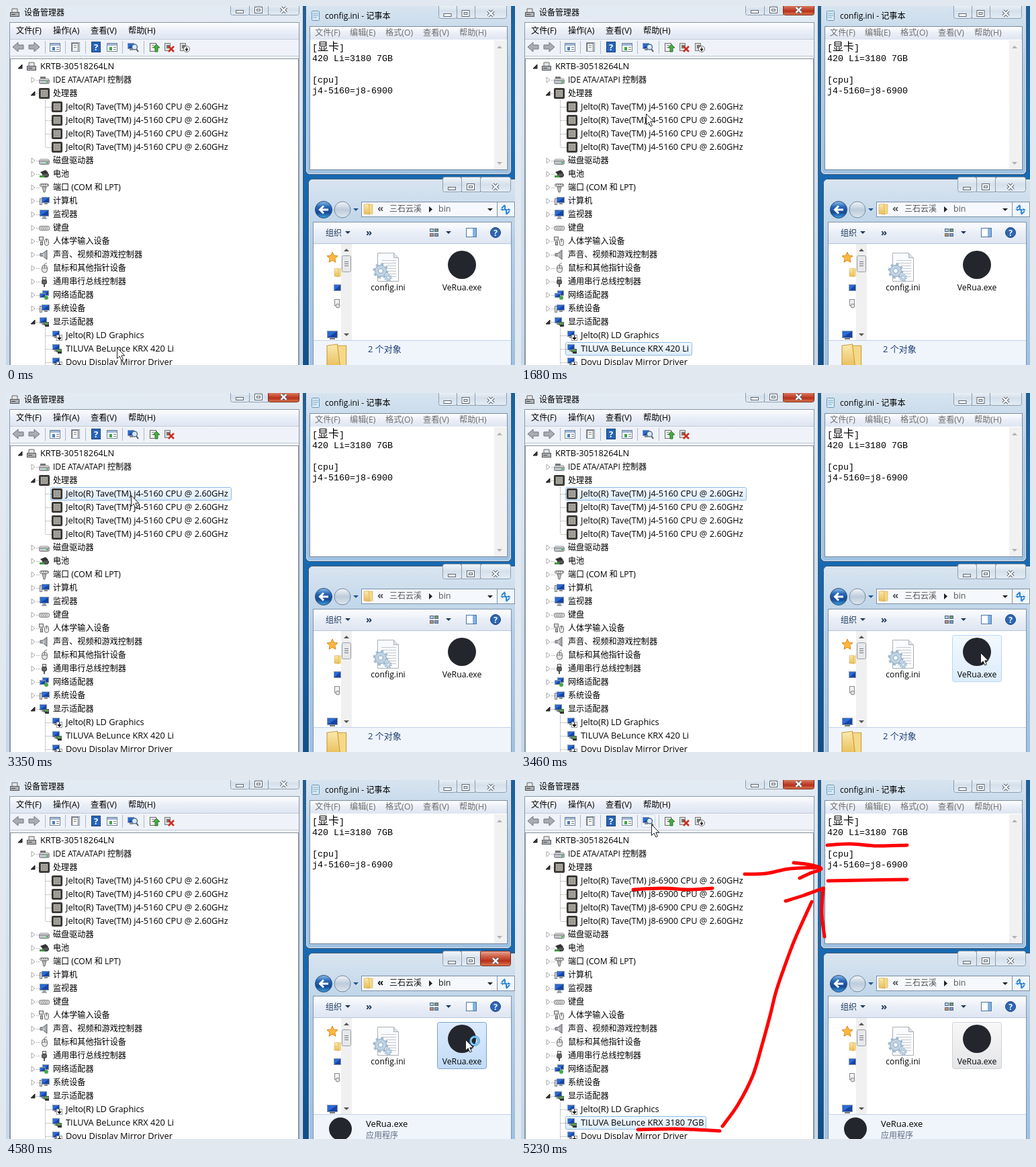
Animation, 758 px wide and 534 px high, one loop 7.31 s. Source, as an HTML page:

```html
<!DOCTYPE html>
<html lang="zh-CN">
<head>
<meta charset="utf-8">
<style>
html, body { margin: 0; width: 100%; height: 100%; overflow: hidden; background: #1766ab; }
svg { display: block; width: 758px; height: 534px; }
text { font-family: "Open Sans", "Noto Sans CJK SC", "Noto Sans CJK", sans-serif; white-space: pre; }
.mono { font-family: "Liberation Mono", "Noto Sans CJK SC", "Noto Sans CJK", monospace; }
</style>
</head>
<body>
<svg id="stage" viewBox="0 0 758 534"></svg>
<script>
const LOOP = 7310;

// ---- drawing helpers ----
const rect = (x, y, w, h, fill, stroke = 'none', r = 0) => {
  const o = stroke === 'none' ? 0 : 0.5;
  return `<rect x="${x + o}" y="${y + o}" width="${w - 2 * o}" height="${h - 2 * o}" rx="${r}" fill="${fill}" stroke="${stroke}"/>`;
};
const path = (d, fill, stroke = 'none', width = 1, extra = '') =>
  `<path d="${d}" fill="${fill}" stroke="${stroke}" stroke-width="${width}" ${extra}/>`;
const circle = (x, y, r, fill, stroke = 'none', width = 1, extra = '') =>
  `<circle cx="${x}" cy="${y}" r="${r}" fill="${fill}" stroke="${stroke}" stroke-width="${width}" ${extra}/>`;
const text = (x, y, s, size = 12, fill = '#000', extra = '') =>
  `<text x="${x}" y="${y}" font-size="${size}" fill="${fill}" ${extra}>${s}</text>`;
const at = (x, y, content, k = 1) => `<g transform="translate(${x} ${y}) scale(${k})">${content}</g>`;
const gradient = (id, ...stops) =>
  `<linearGradient id="${id}" x2="0" y2="1">${stops.map((c, i) =>
    `<stop offset="${i / (stops.length - 1)}" stop-color="${c}"/>`).join('')}</linearGradient>`;
const down = (x, y, fill = '#1e3a5c') => path(`M${x - 4} ${y - 2}h8l-4 4z`, fill);
const up = (x, y, fill) => path(`M${x - 4} ${y + 2}h8l-4-4z`, fill);

// Smooth red marker line through a few points
function marker(...pts) {
  let d = `M${pts[0]}`;
  for (let i = 0; i < pts.length - 1; i++) {
    const [a, b, c, e] = [pts[i - 1] || pts[i], pts[i], pts[i + 1], pts[i + 2] || pts[i + 1]];
    d += `C${b[0] + (c[0] - a[0]) / 6} ${b[1] + (c[1] - a[1]) / 6} ${c[0] - (e[0] - b[0]) / 6} ${c[1] - (e[1] - b[1]) / 6} ${c}`;
  }
  return path(d, 'none', '#f00', 5, 'stroke-linecap="round" stroke-linejoin="round"');
}

const defs = `<defs>
${gradient('desk', '#17619f', '#1b6fb8', '#1261a8', '#0e4f8d')}
${gradient('glass', '#e3ebf3', '#d3e0ed', '#c3d7ea')}
${gradient('clearGlass', '#d9e5f0', '#b4cee6', '#a6c6e4', '#9dc0e2')}
${gradient('bar', '#fdfeff', '#e9eef7', '#dfe6f2')}
${gradient('button', '#f2f6fa', '#d5e0eb', '#e3ecf5')}
${gradient('close', '#e9a999', '#d0644a', '#b8301a', '#dc7c52')}
${gradient('row', '#f3f9fe', '#dcecfb')}
${gradient('item', '#dcebfc', '#c1dbf8')}
${gradient('itemOff', '#f8f8f8', '#e4e5e8')}
${gradient('orb', '#8fc0ec', '#2566b8', '#164a94', '#3fa4e4')}
${gradient('orbOff', '#f3f6f9', '#bccbdb', '#dfe7ee')}
${gradient('folder', '#fbeab0', '#e8bd55')}
</defs>`;

// ---- 16 px icons ----
const screen = (x, y, w, h) => rect(x, y, w, h, '#2a6ad4', '#8c98a8') +
  path(`M${x + 1} ${y + h - 1}L${x + w - 1} ${y + 1}V${y + h - 1}z`, '#1644a5');
const card = screen(1, 1, 11, 9) + rect(4, 10, 5, 2, '#888');
const drive = path('M2 6h12l2 3H0z', '#e6e8ea', '#8c8e92') + rect(0, 8, 16, 6, '#c0c4c8', '#707478', 2) + rect(11, 10, 3, 2, '#3cb44a');
const pc = screen(4, 2, 12, 9) + rect(8, 11, 5, 2, '#888') + rect(1, 4, 4, 10, '#d5d8dc', '#787c82');
const icons = {
  drive,
  ide: drive + rect(2, 3, 8, 3, '#777'),
  root: path('M4 2h8v6H4z', '#e4e6e8', '#666') + rect(1, 7, 14, 7, '#aeb3b8', '#555') + rect(3, 10, 6, 1, '#444'),
  chip: rect(0, 0, 16, 16, '#45433f', '#292826', 1) + rect(3, 3, 10, 10, '#8d8b86', '#c8c5bb') + rect(5, 5, 6, 6, '#a09e98'),
  battery: path('M2 5l8-3 4 4-7 4z', '#333') + rect(5, 6, 10, 7, '#555', '#222', 3) + path('M1 10h7v3H1z', '#3f9a40'),
  port: rect(1, 2, 14, 5, '#e4e4e4', '#777', 2) + path('M3 4h2m1 0h2m1 0h2m1 0h2', 'none', '#444') + path('M5 7h6l-2 8H7z', '#bbb', '#777'),
  pc,
  monitor: screen(1, 1, 14, 10) + path('M6 11h4l2 4H4z', '#9aa2ac'),
  keyboard: rect(0, 5, 16, 7, '#ddd', '#777', 2) + path('M2 7.500h12M3 9.500h10', 'none', '#888', 1, 'stroke-dasharray="2 1"'),
  hid: rect(0, 1, 7, 6, '#ddd', '#666') + rect(2, 8, 4, 6, '#bbb', '#666') + rect(8, 4, 7, 11, '#e8e8e8', '#666', 3) + path('M11.500 4v5', 'none', '#666'),
  sound: path('M2 6h4l6-5v14l-6-5H2z', '#a9adb2', '#5c6065') + path('M7 6v5', 'none', '#eee'),
  mouse: path('M8 4C8 0 11 1 12 0', 'none', '#666') + rect(4, 3, 9, 12, '#e6e6e6', '#666', 4) + path('M8.500 3v5M4 8h9', 'none', '#777'),
  usb: rect(5, 1, 6, 5, '#e5e5e5', '#555') + rect(4, 5, 8, 7, '#666', '#333', 2) + rect(7, 12, 2, 4, '#555'),
  net: screen(5, 1, 10, 8) + screen(1, 5, 9, 7) + circle(11, 12, 3, '#48a848'),
  card: card + rect(7, 8, 8, 5, '#5a9a52', '#49644a') + rect(9, 12, 6, 3, '#333'),
  off: card + rect(7, 7, 9, 9, '#fff', '#999') + path('M11.500 8v4M9 11.500h5l-2.500 3z', '#111', '#111'),
  scan: screen(0, 2, 10, 9) + rect(3, 11, 5, 2, '#888') + path('M13 11l3 4', 'none', '#555', 2) + circle(10.5, 8, 4, '#dbeaf8', '#50708f', 1.5)
};

// ---- window chrome ----
const frame = (x, y, w, h, glass) => rect(x, y, w, h, `url(#${glass})`, '#43586e', 6) + rect(x + 1, y + 1, w - 2, h - 2, 'none', '#dce9f4', 5);

function buttons(x, y, w1, w2, w3, h, active) {
  const ink = '#5c6670', line = '#8f9eae', close = x + w1 + w2;
  const mid = y + h - 8;
  return rect(x, y - 4, w1 + 1, h + 4, 'url(#button)', line, 3) + rect(x + w1, y - 4, w2 + 1, h + 4, 'url(#button)', line) +
    rect(close, y - 4, w3, h + 4, active ? 'url(#close)' : 'url(#button)', active ? '#7c2a1c' : line, 3) +
    rect(x + w1 / 2 - 6, mid, 12, 5, '#fff', ink) +
    rect(x + w1 + w2 / 2 - 6, mid - 5, 12, 10, '#fff', ink) + rect(x + w1 + w2 / 2 - 3, mid - 2, 6, 4, '#dfe7ef', ink) +
    [[ink, 4.5], ['#fff', 2.4]].map(([c, w]) =>
      path(`M${close + w3 / 2 - 4} ${mid - 4}l8 8m0-8l-8 8`, 'none', c, w)).join('');
}

const menu = (labels, xs, y, fill) => labels.map((s, i) => text(xs[i], y, s, 12.2, fill)).join('');
const help = (x, y) => circle(x, y, 7.5, '#2e66b5', '#1c4380') + text(x, y + 4.5, '?', 12, '#fff', 'text-anchor="middle" font-weight="700"');

// ---- device manager ----
const groups = [
  ['磁盘驱动器', 'drive'], ['电池', 'battery'], ['端口 (COM 和 LPT)', 'port'], ['计算机', 'pc'], ['监视器', 'monitor'],
  ['键盘', 'keyboard'], ['人体学输入设备', 'hid'], ['声音、视频和游戏控制器', 'sound'], ['鼠标和其他指针设备', 'mouse'],
  ['通用串行总线控制器', 'usb'], ['网络适配器', 'net'], ['系统设备', 'pc']
];

function treeRow(level, y, label, icon, open) {
  const x = 32 + level * 19, ex = x - 11;
  const arrow = open === undefined ? '' : open
    ? path(`M${ex + 3} ${y - 3}v6h-6z`, '#333', '#222')
    : path(`M${ex - 2} ${y - 4}l5 4-5 4z`, '#fff', '#a5a5a5');
  const dots = level ? path(`M${x - (level > 1 ? 11 : 6)} ${y + .5}H${x - 1}`, 'none', '#999', 1, 'stroke-dasharray="1 1"') : '';
  return dots + arrow + at(x - 2, y - 8, icons[icon]) + text(x + 19, y + 4, label, level === 1 ? 12.1 : 12.8);
}

function toolbar(s) {
  const arrow = (x, dir) => path(`M${x - 8 * dir} 61l${8 * dir}-7v4h${8 * dir}v6h${-8 * dir}v4z`, '#a9adb3', '#70757c');
  const panel = (x, c) => rect(x - 8, 55, 16, 13, '#fff', '#71849c') + rect(x - 7, 56, 14, 3, '#9db6d3') + rect(x - 4, 61, 4, 5, c) + rect(x + 2, 61, 4, 1, '#777') + rect(x + 2, 64, 4, 1, '#777');
  const separators = [58, 88, 118, 173, 205].map(x => rect(x, 52, 1, 19, '#aeb9c8')).join('');
  const sheet = x => rect(x - 5, 55, 10, 13, '#f2f2f2', '#666') + rect(x - 2, 58, 4, 1, '#888') + rect(x - 2, 61, 4, 1, '#888');
  const plug = x => rect(x - 7, 55, 9, 12, '#ddd', '#777') + rect(x - 4, 58, 6, 5, '#777');
  return separators + arrow(18, 1) + arrow(42, -1) + panel(73, '#4b7fc0') + sheet(103) + rect(97, 54, 13, 14, 'none', '#8595a8') +
    rect(127, 53, 14, 16, '#2864b8', '#174380') + text(134, 66, '?', 13, '#fff', 'text-anchor="middle" font-weight="700"') +
    panel(158, '#3fa547') +
    (s.scan ? rect(179, 51, 21, 20, '#f4f8fd', '#c3d5e8', 2) : '') + at(181, 53, icons.scan) +
    sheet(219) + path('M222 68v-6h-3l5-5 5 5h-3v6z', '#4cab45', '#287229') +
    plug(243) + path('M242 60l8 8m0-8l-8 8', 'none', '#d22c20', 2.5) +
    (s.noDisable ? '' : plug(266) + circle(269, 64, 4.5, '#fff', '#666') + path('M269 61v3m-2 0h4l-2 3z', '#222', '#222'));
}

function deviceManager(s) {
  const cpu = `Jelto(R) Tave(TM) ${s.spoofed ? 'j8-6900' : 'j4-5160'} CPU @ 2.60GHz`;
  const gpu = `TILUVA BeLunce KRX ${s.spoofed ? '3180 7GB' : '420 Li'}`;
  const select = s.sel === 'cpu' ? rect(66, 140, 270, 20, 'url(#row)', '#8fbbe6', 2)
    : s.sel === 'gpu' ? rect(66, 500, s.spoofed ? 210 : 189, 20, 'url(#row)', '#8fbbe6', 2) : '';
  const line = (x, y1, y2) => path(`M${x}.5 ${y1}V${y2}`, 'none', '#999', 1, 'stroke-dasharray="1 1"');
  return frame(-2, -12, 445, 570, 'glass') +
    at(5, 2, icons.root) + text(27, 14, '设备管理器') + buttons(334, 0, 28, 28, 47, 14, s.active === 'devices') +
    rect(5, 24, 432, 520, '#f0f3f8', '#8797a9') + rect(6, 25, 430, 24, 'url(#bar)') +
    menu(['文件(F)', '操作(A)', '查看(V)', '帮助(H)'], [15, 70, 126, 182], 41, '#000') +
    rect(6, 49, 430, 1, '#c3ccd9') + rect(6, 50, 430, 24, '#eff3f9') + rect(6, 74, 430, 1, '#c3ccd9') + toolbar(s) +
    rect(6, 78, 430, 460, '#fff', '#8a929c') + select + line(58, 140, 210) + line(58, 480, 534) +
    treeRow(0, 90, 'KRTB-30518264LN', 'root', true) +
    treeRow(1, 110, 'IDE ATA/ATAPI 控制器', 'ide', false) +
    treeRow(1, 130, '处理器', 'chip', true) +
    [150, 170, 190, 210].map(y => treeRow(2, y, cpu, 'chip')).join('') +
    groups.map(([label, icon], i) => treeRow(1, 230 + 20 * i, label, icon, false)).join('') +
    treeRow(1, 470, '显示适配器', 'card', true) +
    treeRow(2, 490, 'Jelto(R) LD Graphics', 'off') + treeRow(2, 510, gpu, 'card') + treeRow(2, 530, 'Dovu Display Mirror Driver', 'off');
}

// ---- notepad ----
const notepad = () => frame(446, -4, 307, 255, 'clearGlass') +
  rect(455, 7, 12, 15, '#d7ecf8', '#6d93b0', 1) + path('M457 11h8m-8 3h8m-8 3h6', 'none', '#7aa6c4') +
  text(475, 19, 'config.ini - 记事本', 12.1) + buttons(644, 0, 27, 27, 48, 19, false) +
  rect(452, 30, 295, 214, '#fff', '#7d8b9a') + rect(453, 31, 293, 19, 'url(#bar)') +
  menu(['文件(F)', '编辑(E)', '格式(O)', '查看(V)', '帮助(H)'], [460, 512, 565, 621, 675], 44, '#6d6d6d') +
  rect(727, 51, 18, 192, '#f1f1f1') + up(735, 61, '#b0b0b0') + down(735, 234, '#b0b0b0') +
  ['[<tspan font-size="16">显卡</tspan>]', '420 Li=3180 7GB', '', '[cpu]', 'j4-5160=j8-6900']
    .map((s, i) => text(456, 66 + 16 * i, s, 13.33, '#000', 'class="mono"')).join('');

// ---- file explorer ----
const gear = (x, y, k) => at(x, y, circle(0, 0, 8.5, '#bfd3e4', '#8aa6bf') +
  circle(0, 0, 10, 'none', '#9fb8cd', 3, 'stroke-dasharray="3.900 3.950"') + circle(0, 0, 3.5, '#f4f8fb', '#8aa6bf'), k);
const folder = (x, y, k) => at(x, y, path('M4 1h9v14H4z', '#f5d988', '#c99a3c', .5) + path('M0 1l7-1 2 16-9-1z', 'url(#folder)', '#c99a3c', .5), k);

function explorer(s) {
  const active = s.active === 'explorer', ink = active ? '#111' : '#555';
  const itemFill = { on: ['url(#item)', '#7da2ce'], hover: ['url(#row)', '#b8d6fb'], off: ['url(#itemOff)', '#d2d2d2'] }[s.item];
  const details = s.picked
    ? circle(498, 519, 17, '#24262d') + text(536, 516, 'VeRua.exe', 13) + text(536, 533, '应用程序', 12, '#5a6b83')
    : folder(478, 503, 2.2) + text(539, 515, '2 个对象', 13, '#1e3f74');
  return frame(450, 257, 316, 290, 'clearGlass') + buttons(650, 258, 28, 28, 46, 19, active) +
    circle(501, 303, 12, 'url(#orbOff)', '#74889d') + circle(473, 303, 12.5, 'url(#orb)', '#2b4a70') +
    path('M480 303h-12m5-5.500l-5.500 5.500 5.500 5.500', 'none', '#fff', 3) + down(521, 303, '#1d5590') +
    rect(529, 291, 203, 23, '#f5f9fd', '#7c90a6') + rect(731, 291, 27, 23, '#f0f6fc', '#7c90a6') +
    folder(533, 294, 1) + text(553, 306, '«', 15, ink, 'font-weight="700"') + text(571, 306, '三石云溪', 12, ink) +
    path('M630 298l5 4.500-5 4.500z', '#222') + text(644, 306, 'bin', 12.5, ink) + down(721, 303, '#222') +
    path('M743 297v7m-5-3l5-5M745 309v-7m5 3l-5 5', 'none', '#2f86d8', 2) + path('M736 302h7l-3.500 3zM745 304h7l-3.500-3z', '#2f86d8') +
    rect(457, 321, 296, 220, '#fff', '#8093a8') + rect(458, 322, 294, 31, 'url(#bar)') + rect(458, 353, 294, 1, '#b6c5d8') +
    text(476, 342, '组织', 12, '#1e3a5c') + down(509, 337) + text(536, 342, '»', 15, '#1e3a5c', 'font-weight="700"') +
    [0, 1, 2, 3].map(i => rect(631 + i % 2 * 7, 331 + (i >> 1) * 7, 6, 5, ['#b5cae2', '#6fa06c', '#d28a62', '#7f9cc4'][i], '#53677f')).join('') +
    down(659, 337) + rect(685, 330, 16, 14, '#fff', '#52779f') + rect(695, 331, 5, 12, '#7db3e6') + help(729, 337) +
    path('M486 366l2.400 5.200 5.600.6-4.200 3.800 1.200 5.600-5-2.900-5 2.900 1.200-5.600-4.200-3.800 5.600-.6z', '#ffb83d', '#d9851d') +
    folder(489, 390, .8) + screen(488, 414, 11, 10) + rect(489, 436, 8, 10, '#eef2f6', '#888') + circle(494, 446, 3, '#ddd', '#888') +
    screen(478, 483, 16, 11) + rect(482, 494, 8, 2, '#777') +
    rect(499, 354, 16, 143, '#f0f0f0') + rect(500, 371, 14, 25, '#e6e8eb', '#989ca2', 2) + path('M504 380.500h6m-6 3h6m-6 3h6', 'none', '#777') +
    up(507, 363, '#555') + down(507, 489, '#555') +
    path('M553.500 367.500h24l7 7v35h-31z', '#fafbfc', '#a9b0b8') + path('M577.500 367.500v7h7', '#dde3e9', '#a9b0b8') +
    path('M559 378.500h22m-22 4h22m-15 4h15m-12 4h12m-12 4h12m-12 4h12m-14 4h14', 'none', '#c4c9cf') +
    gear(558, 394, 1) + gear(569, 404, .5) + text(569, 423, 'config.ini', 12.2, '#000', 'text-anchor="middle"') +
    (itemFill ? rect(642, 360, 74, 70, ...itemFill, 3) : '') +
    circle(679, 385, 21, '#24262d') + text(679, 423, 'VeRua.exe', 12.2, '#000', 'text-anchor="middle"') +
    rect(458, 497, 294, 40, '#f0f5fc') + rect(458, 497, 294, 1, '#c4d3e6') + details;
}

// ---- pointer and annotations ----
const pointer = ([x, y], s) =>
  (s.click ? circle(x + 1, y + 3, 11.5, '#f2c81e', 'none', 0, 'opacity=".75"') : '') +
  (s.busy ? circle(x + 14, y + 2, 6, 'none', '#3f9bd8', 3.5) + circle(x + 14, y + 2, 6, 'none', '#b9e3f8', 1.2) : '') +
  at(x, y, path('M.5.5v16l3.700-3.500 2.700 6 2.600-1.200-2.700-5.800h5z', '#fff', '#222'));

const cpuUnderline = marker([167, 163], [210, 161], [250, 163], [285, 161]);
const gpuMarks = marker([94, 526], [150, 525], [210, 524], [258, 525]) +
  marker([250, 494], [290, 450], [320, 417], [341, 386], [352, 355], [361, 328], [374, 306], [379, 275], [383, 240], [387, 207], [398, 180], [411, 150], [425, 123], [445, 105], [478, 84]) +
  marker([426, 103], [450, 93], [478, 83], [474, 95], [466, 107]);
const cpuMarks = cpuUnderline + marker([338, 148], [390, 142], [452, 131]) + marker([428, 122], [454, 131], [432, 145]);
const ringMark = marker([692, 354], [660, 354], [632, 373], [620, 404], [634, 432], [661, 448], [687, 452], [715, 440], [731, 411], [726, 376], [704, 357], [674, 352]);
const resultMarks = cpuUnderline +
  marker([333, 140], [365, 139], [400, 132], [444, 130]) + marker([406, 123], [430, 126], [447, 132], [430, 139], [415, 146]) +
  marker([456, 97], [490, 95], [530, 98], [575, 97]) + marker([457, 150], [510, 149], [575, 148]) +
  marker([174, 520], [230, 519], [296, 522]) +
  marker([300, 515], [323, 483], [345, 440], [359, 394], [371, 350], [380, 314], [393, 276], [409, 234], [433, 181]) +
  marker([394, 180], [420, 172], [450, 161]) + marker([450, 161], [448, 198], [452, 233]);

// ---- timeline ----
const onGpu = [165, 508], onScan = [194, 66], onApp = [684, 386];
const scenes = [
  { from: 0, pos: onGpu },
  { from: 80, pos: onGpu, active: 'devices', sel: 'gpu', click: true, marks: gpuMarks },
  { from: 1680, pos: [186, 160], active: 'devices', sel: 'gpu' },
  { from: 1770, pos: [186, 152], active: 'devices', sel: 'cpu', click: true, noDisable: true, marks: cpuMarks },
  { from: 3350, pos: [186, 152], active: 'devices', sel: 'cpu', noDisable: true },
  { from: 3410, pos: [480, 290], active: 'devices', sel: 'cpu', noDisable: true },
  { from: 3460, pos: onApp, active: 'devices', sel: 'cpu', noDisable: true, item: 'hover' },
  { from: 3510, pos: onApp, noDisable: true, item: 'on', picked: true, click: true, marks: ringMark },
  { from: 4580, pos: onApp, active: 'explorer', noDisable: true, item: 'on', picked: true, busy: true },
  { from: 4650, pos: onScan, active: 'devices', noDisable: true, item: 'off', picked: true, click: true, scan: true },
  { from: 5230, pos: onScan, active: 'devices', sel: 'gpu', item: 'off', picked: true, scan: true, spoofed: true, marks: resultMarks }
];

const stage = document.getElementById('stage');
const start = performance.now();
let shown;

function draw(now) {
  const t = Math.max(0, now - start) % LOOP;
  const scene = scenes.findLast(s => s.from <= t);
  if (scene !== shown) {
    shown = scene;
    stage.innerHTML = defs + rect(0, 0, 758, 534, 'url(#desk)') + deviceManager(scene) + notepad() + explorer(scene) +
      (scene.marks || '') + pointer(scene.pos, scene);
  }
  requestAnimationFrame(draw);
}
draw(start);
</script>
</body>
</html>
```
